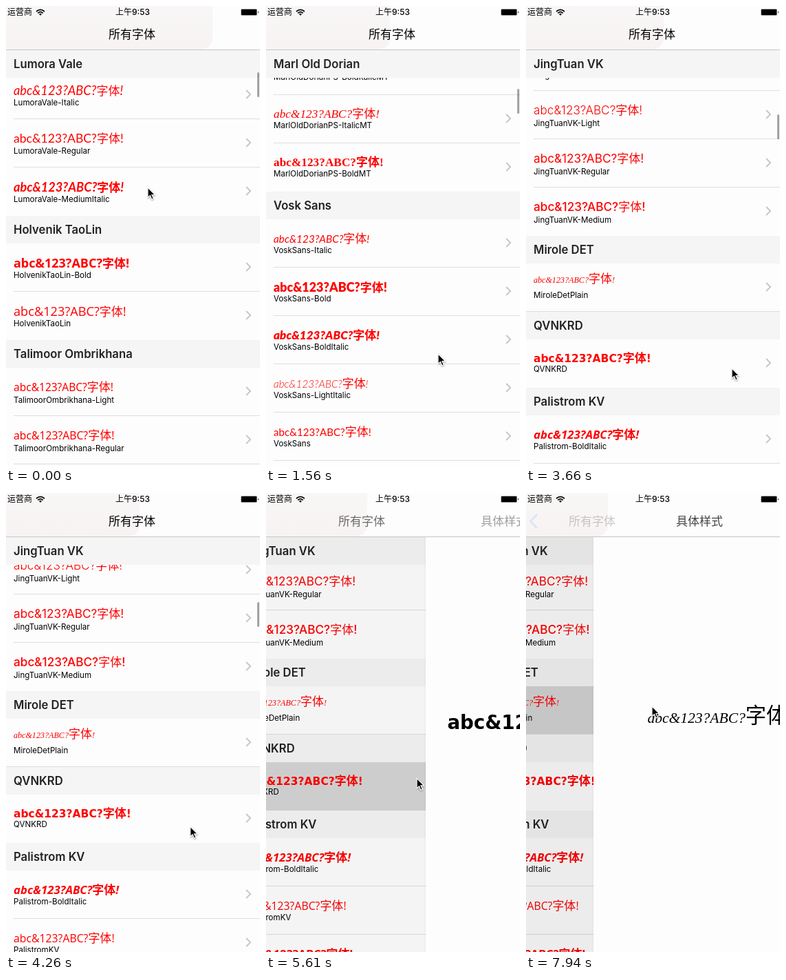
Write an HTML page that moves like this. It is 369 px wide and 665 px high and loops after 8000 ms.

```html
<!DOCTYPE html>
<html lang="zh">
<head>
<meta charset="utf-8">
<title>所有字体</title>
<style>
  html, body { margin: 0; width: 100%; height: 100%; overflow: hidden; background: #fdfdfd; }
  body { position: relative; font-family: Inter, "Noto Sans CJK SC", "Noto Sans CJK", sans-serif; color: #000; }
  div, svg { position: absolute; }
  #stage { left: 0; top: 0; width: 369px; height: 665px; overflow: hidden; background: #fdfdfd; white-space: nowrap; }
  #page { left: 0; top: 0; width: 369px; height: 665px; }
  #tint { left: 0; top: 0; height: 63px; background: linear-gradient(#f8f6f6, #f8f3f3); border-radius: 0 0 16px 0; }
  #list { left: 0; top: 64px; width: 369px; height: 601px; overflow: hidden; isolation: isolate; }
  .section { position: relative; }
  .head { position: sticky; top: 0; z-index: 1; height: 40px; line-height: 40px; padding-left: 11px;
          background: #f5f5f5; font-size: 16.7px; font-weight: 600; color: #222; }
  .row { position: relative; height: 70px; }
  .row.line::after { content: ""; position: absolute; left: 11px; right: 0; bottom: 0; height: 1px; background: #dedee0; }
  .row.full::after { left: 0; }
  .fill { inset: 0; background: #d5d5d5; opacity: 0; }
  .sample { left: 11px; height: 24px; line-height: 24px; color: #f00; }
  .cjk { font-family: "Noto Sans CJK SC", "Noto Sans CJK", sans-serif; font-style: normal; line-height: 0; }
  .sub { left: 11px; height: 16px; line-height: 16px; font-size: 11.6px; }
  .more { left: 347px; top: 27px; }
  #bar { left: 365px; width: 3px; height: 36px; border-radius: 2px; background: rgba(0, 0, 0, .36); }
  #dim { left: 0; top: 64px; width: 369px; height: 601px; background: #000; }
  #detail { left: 0; top: 64px; width: 369px; height: 601px; background: #fdfdfd; box-shadow: 0 0 4px rgba(0, 0, 0, .08); }
  #big { left: 0; width: 367px; height: 50px; line-height: 50px; text-align: center; }
  #rule { left: 0; top: 63px; width: 369px; height: 1px; background: #c6c6c6; }
  .nav { left: 0; top: 29px; height: 24px; line-height: 24px; font-size: 17px; }
  .title { font-weight: 500; }
  .blue { color: #0a7aff; font-weight: 300; }
  .status { top: 1px; height: 16px; line-height: 16px; font-size: 12px; }
</style>
</head>
<body>
<div id="stage">
  <div id="page">
    <div id="tint"></div>
    <div id="list"></div>
    <div id="bar"></div>
    <div id="dim"></div>
  </div>
  <div id="detail"><div id="big"></div></div>
  <div id="rule"></div>
  <div class="nav title" id="home">所有字体</div>
  <div class="nav blue" id="back">所有字体</div>
  <svg id="arrow" width="14" height="24" style="left:4px;top:29px"><path d="M12 2 2.5 12 12 22" fill="none" stroke="#0a7aff" stroke-width="3"/></svg>
  <div class="nav title" id="style">具体样式</div>
  <div class="status" style="left:2px">运营商</div>
  <svg width="14" height="11" style="left:43px;top:4px" fill="none" stroke="#000" stroke-width="1.7">
    <path d="M1 4Q7-1.400 13 4M3.200 6.300Q7 3 10.800 6.300"/><path d="M5 7.500Q7 6 9 7.500L7 10Z" fill="#000" stroke="none"/>
  </svg>
  <div class="status" style="left:159px;font-weight:500">上午9:53</div>
  <svg width="28" height="11" style="left:341px;top:4px">
    <rect x=".5" y=".5" width="23" height="9" rx="1" fill="none" stroke="#999"/>
    <rect x="1" y="1" width="22" height="8"/><path d="M25 3.500q2 1.500 0 3z"/>
  </svg>
  <svg id="mouse" width="16" height="22" style="left:-1px;top:-1px">
    <path d="M1 1V15.500L4.400 12.400 6.800 18 9.300 17 6.900 11.500H11.500Z" stroke="#fff" stroke-width="1.200" style="filter:drop-shadow(0 1px 1px rgba(0,0,0,.4))"/>
  </svg>
</div>
<script>
const LOOP = 8000, W = 369;
const $ = id => document.getElementById(id);

// family name, font name stem, stand-in face, sub-label centre, rows of "suffix weight size"
const SECTIONS = [
  ["Lumora Vale", "LumoraVale", "Lato", 46, ["-Italic 400i 18.3", "-Regular 400 17.6", "-MediumItalic 700i 18.2"]],
  ["Holvenik TaoLin", "HolvenikTaoLin", "Open Sans", 46, ["-Bold 700 18", " 400 18.2"]],
  ["Talimoor Ombrikhana", "TalimoorOmbrikhana", "Noto Sans", 47, ["-Light 300 15.5", "-Regular 400 15.7", "-Semibold 600 16"]],
  ["Oskerby", "Oskerby", "Noto Serif", 45, [" 400 16"]],
  ["Quillanto", "Quillanto", "Roboto", 45, [" 400 17"]],
  ["Marl Old Dorian", "MarlOldDorianPS", "Liberation Serif", 44, ["MT 400 17.3", "-BoldItalicMT 700i 17.3", "-ItalicMT 400i 17.3", "-BoldMT 700 17.3"]],
  ["Vosk Sans", "VoskSans", "Lato", 45, ["-Italic 400i 15.4", "-Bold 900 17.9", "-BoldItalic 900i 17.1", "-LightItalic 300i 15.4", " 400 15.1",
    "-SemiBold 600 16", "-SemiBoldItalic 600i 16", "-UltraBold 900 18"]],
  ["Pellomar", "Pellomar", "Noto Serif", 45, [" 400i 16"]],
  ["Tundira", "Tundira", "Liberation Sans", 49, ["-Bold 700 17", " 400 17"]],
  ["LuanQiao", "LuanQiao", "Lato", 43, [" 600 16"]],
  ["Orrimby Hand", "OrrimbyHandQLVTT", "Lato", 45, ["-Bold 600i 16.5"]],
  ["JingTuan VK", "JingTuanVK", "Inter", 47, ["-Ultralight 100 17", "-Semibold 600 17.2", "-Thin 200 17.1", "-Light 300 17.2", "-Regular 400 17.2", "-Medium 500 17.2"]],
  ["Mirole DET", "MiroleDetPlain", "Liberation Serif", 46, [" 400i 12.1"]],
  ["QVNKRD", "QVNKRD", "DejaVu Sans", 43, [" 700 15.5"]],
  ["Palistrom KV", "Palistrom", "Open Sans", 45, ["-BoldItalic 700i 16.8", "KV 400 15.8", "KV-Bold 700 16.4", "-Italic 400i 16"]]
];

function add(parent, cls, text) {
  const el = document.createElement("div");
  el.className = cls;
  if (text) el.textContent = text;
  return parent.appendChild(el);
}

function setSample(el, face, spec, scale) {
  const [, style, size] = spec.split(" ");
  const weight = parseInt(style);
  el.innerHTML = 'abc&amp;123?ABC?<span class="cjk">字体</span>!';
  el.style.fontFamily = `"${face}", "Noto Sans CJK SC", sans-serif`;
  el.style.fontWeight = weight;
  el.style.fontStyle = style.endsWith("i") ? "italic" : "normal";
  el.style.fontSize = size * scale + "px";
  const cjk = el.querySelector(".cjk");
  cjk.style.fontSize = 17 * scale + "px";
  cjk.style.fontWeight = Math.max(100, Math.min(700, weight) - 100);
}

const fills = {};
for (const [name, stem, face, subY, rows] of SECTIONS) {
  const sec = add($("list"), "section");
  add(sec, "head", name);
  rows.forEach((spec, i) => {
    const full = name === "Mirole DET";
    const row = add(sec, "row" + (i < rows.length - 1 ? " line" : full ? " line full" : ""));
    fills[name] = add(row, "fill");
    const sample = add(row, "sample");
    setSample(sample, face, spec, 1);
    sample.style.top = (full ? 12 : 16) + "px";
    add(row, "sub", stem + spec.split(" ")[0]).style.top = subY - 8 + "px";
    row.insertAdjacentHTML("beforeend",
      '<svg class="more" width="10" height="14"><path d="M2 1 8 7 2 13" fill="none" stroke="#c7c7cc" stroke-width="2"/></svg>');
  });
}

const SCROLL = [[0, 10], [700, 640], [1560, 1015], [2000, 1280], [2760, 2026], [3200, 2400], [3660, 2521],
  [4300, 2570], [5010, 2612], [5400, 2614], [LOOP, 2614]];
const MOUSE = [[0, 206, 263], [300, 206, 263], [1000, 244, 500], [1560, 250, 504], [2150, 300, 281], [2760, 300, 281],
  [3300, 299, 525], [3660, 299, 525], [5010, 224, 425], [5500, 224, 425], [6500, 61, 39], [6850, 61, 39],
  [7600, 183, 309], [LOOP, 183, 309]];
const TINT = [[0, 300], [1560, 180], [2760, 202], [3660, 200], [5010, 187], [LOOP, 200]];

// monotone cubic through the points of a track
function at(track, t, k = 1) {
  const slope = i => track[i + 1] && track[i] ? (track[i + 1][k] - track[i][k]) / (track[i + 1][0] - track[i][0]) : 0;
  const tangent = i => {
    const a = slope(i - 1), b = slope(i);
    return a * b > 0 ? 2 * a * b / (a + b) : 0;
  };
  let i = 0;
  while (i < track.length - 2 && t >= track[i + 1][0]) i++;
  const h = track[i + 1][0] - track[i][0], u = (t - track[i][0]) / h, v = 1 - u;
  return v * v * ((1 + 2 * u) * track[i][k] + u * h * tangent(i)) +
         u * u * ((1 + 2 * v) * track[i + 1][k] - v * h * tangent(i + 1));
}

const clamp = x => Math.max(0, Math.min(1, x));
const slide = dt => 1 - (1 - clamp(dt / 500)) ** 2;

// the picture holds between these beats
function beat(t) {
  const hold = (from, len) => from + Math.floor((t - from) / len) * len;
  if (t < 210) return 0;
  if (t < 5460) return hold(210, 150);
  if (t < 6610) return hold(5460, 143.75);
  if (t < 7790) return hold(6610, 147.5);
  return t < 7940 ? 7790 : 7940;
}

const PUSH1 = 5500, POP = 6820, PUSH2 = 7698;
const move = (id, x, y = 0) => { $(id).style.transform = `translate(${x}px, ${y}px)`; };
const fade = (id, o) => { $(id).style.opacity = clamp(o); };
let shown = null;

function showDetail(name) {
  if (shown === name) return;
  shown = name;
  const sec = SECTIONS.find(s => s[0] === name);
  setSample($("big"), sec[2], sec[4][0], 1.78);
  $("big").style.top = (name === "QVNKRD" ? 244 : 237) + "px";
}

function draw(t) {
  const p = t < POP ? slide(t - PUSH1) : t < PUSH2 ? 1 - slide(t - POP) : slide(t - PUSH2);
  const s = at(SCROLL, t);
  showDetail(t < 7500 ? "QVNKRD" : "Mirole DET");

  $("list").scrollTop = Math.round(s);
  move("bar", 0, Math.round(96 + (s - 10) * 0.0243));
  fade("bar", 1 - (t - 5350) / 250);
  $("tint").style.width = at(TINT, t) + "px";
  fade("tint", (1 - p) * 4);
  move("page", Math.round(-0.3 * W * p));
  fade("dim", 0.09 * p);
  move("detail", Math.round(W * (1 - p)));
  $("detail").style.visibility = p > 0 ? "visible" : "hidden";

  fills["QVNKRD"].style.opacity = t < 5400 || t > 7500 ? 0 : t < POP ? 1 : p;
  fills["Mirole DET"].style.opacity = t > 7620 ? 1 : 0;

  const pressed = t > 6700 && t < 7500 ? 0.28 : 1;
  move("home", Math.round(149 - 118 * p));
  fade("home", (1 - p) ** 1.2);
  move("back", Math.round(149 - 126 * p));
  fade("back", (p - 0.75) / 0.25 * pressed);
  fade("arrow", (p - 0.7) / 0.3 * pressed);
  move("style", Math.round(149 + 260 * (1 - p)));
  fade("style", p);
  move("mouse", at(MOUSE, t, 1), at(MOUSE, t, 2));
}

const start = performance.now();
function tick() {
  draw(beat((performance.now() - start) % LOOP));
  requestAnimationFrame(tick);
}
tick();
</script>
</body>
</html>
```
